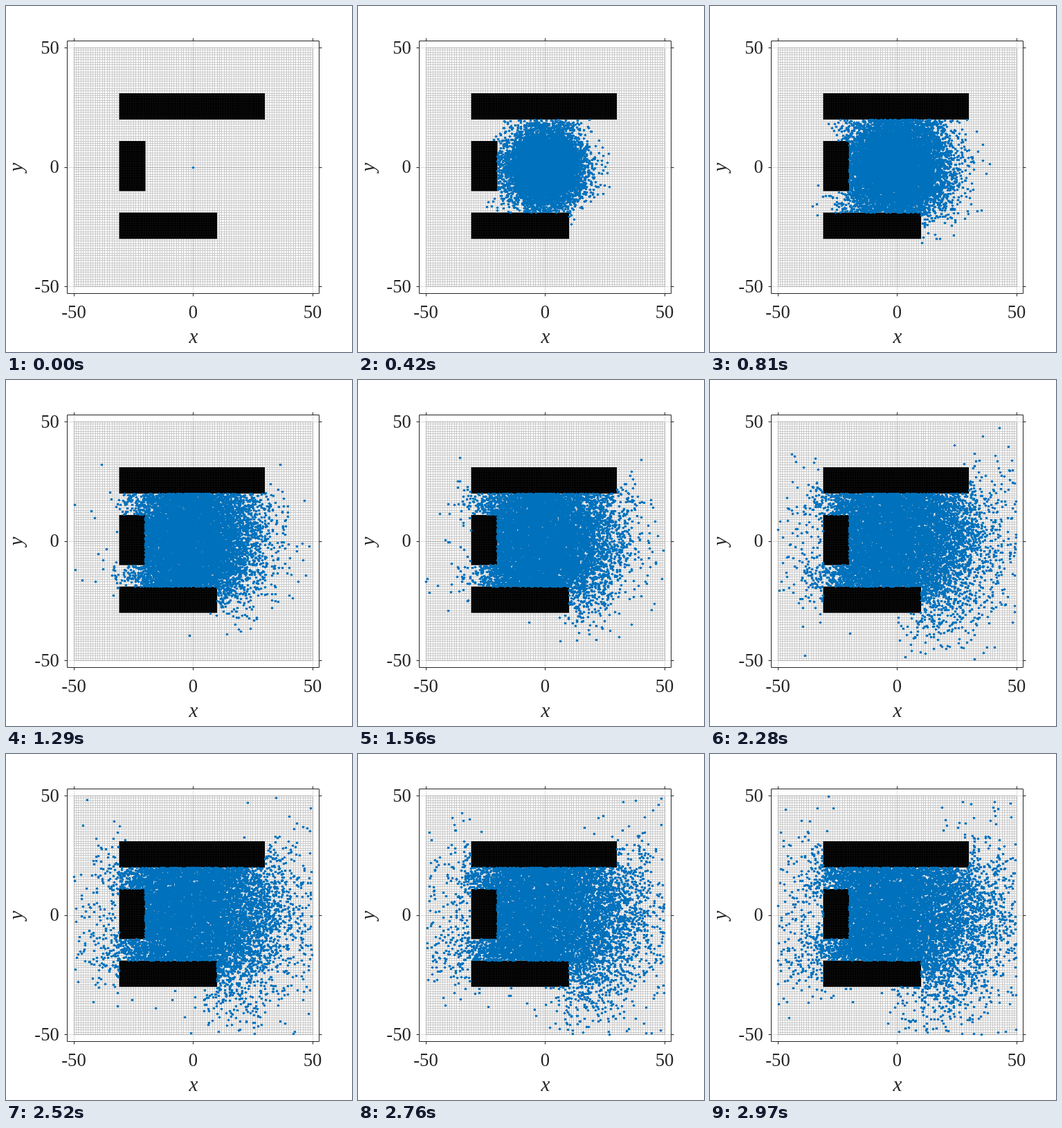
An HTML page with a canvas that plays this animation: 500 by 500 pixels, repeating every 3000 ms.

```html
<!DOCTYPE html>
<html lang="en">
<head>
<meta charset="utf-8">
<title>Random walk among obstacles</title>
<style>
  html, body { margin: 0; width: 100%; height: 100%; overflow: hidden; background: #fff; }
  svg, canvas { position: absolute; left: 0; top: 0; width: 500px; height: 500px; }
  text { font: 26.6px "Liberation Serif", "Noto Serif", serif; fill: #262626; }
  .name { font-size: 29px; font-style: italic; text-anchor: middle; }
</style>
</head>
<body>
<svg viewBox="0 0 500 500">
  <g id="guides" stroke="#dfdfdf"></g>
  <g id="walls"></g>
  <path id="mesh" fill="none" stroke="rgba(40,40,40,.25)" shape-rendering="crispEdges"/>
  <path id="axes" fill="none" stroke="#262626"/>
  <g id="labels"></g>
  <text class="name" x="271" y="486.5">x</text>
  <text class="name" transform="translate(24 233) rotate(-90)">y</text>
</svg>
<canvas id="dots" width="500" height="500"></canvas>
<script>
const FRAME_MS = 30, FRAMES = 100, COUNT = 10000;
const STEP = 2.04, LIMIT = 50, SCALE = 3.45;
const BOX = { left: 88.5, top: 50.5, right: 452.5, bottom: 415.5 };
// Obstacles as x0, x1, y0, y1 in plot units
const WALLS = [[-31, 30, 20, 31], [-31, -20, -10, 11], [-31, 10, -30, -19]];

const byId = id => document.getElementById(id);
const px = x => 270.5 + SCALE * x;
const py = y => 233 - SCALE * y;
const snap = v => Math.floor(v) + 0.5;

function add(parent, tag, attrs, text = '') {
  const el = document.createElementNS('http://www.w3.org/2000/svg', tag);
  for (const key in attrs) el.setAttribute(key, attrs[key]);
  el.textContent = text;
  parent.appendChild(el);
}

function drawPlot() {
  const { left, top, right, bottom } = BOX;
  let mesh = '';
  for (let v = -LIMIT; v <= LIMIT; v++) {
    mesh += `M${snap(px(v))} ${py(LIMIT)}V${py(-LIMIT)}`;
    mesh += `M${px(-LIMIT)} ${snap(py(v))}H${px(LIMIT)}`;
  }
  byId('mesh').setAttribute('d', mesh);

  for (const [x0, x1, y0, y1] of WALLS) {
    add(byId('walls'), 'rect', {
      x: px(x0), y: py(y1), width: SCALE * (x1 - x0), height: SCALE * (y1 - y0)
    });
  }

  let axes = `M${left} ${top}H${right}V${bottom}H${left}Z`;
  for (const v of [-50, 0, 50]) {
    const x = snap(px(v)), y = snap(py(v));
    axes += `M${x} ${top}v-4M${x} ${bottom}v4M${left} ${y}h-4M${right} ${y}h4`;
    add(byId('guides'), 'path', { d: `M${x} ${top}V${bottom}M${left} ${y}H${right}` });
    add(byId('labels'), 'text', { x: px(v), y: 451, 'text-anchor': 'middle' }, v);
    add(byId('labels'), 'text', { x: 76.8, y: py(v) + 8, 'text-anchor': 'end' }, v);
  }
  byId('axes').setAttribute('d', axes);
}

function seeded(seed) {
  return () => {
    seed = (seed + 0x6D2B79F5) | 0;
    let t = Math.imul(seed ^ (seed >>> 15), 1 | seed);
    t = (t + Math.imul(t ^ (t >>> 7), 61 | t)) ^ t;
    return ((t ^ (t >>> 14)) >>> 0) / 4294967296;
  };
}

const outside = (x, y) => Math.abs(x) > LIMIT || Math.abs(y) > LIMIT;
const blocked = (x, y) => outside(x, y) ||
  WALLS.some(([x0, x1, y0, y1]) => x > x0 && x < x1 && y > y0 && y < y1);

// Pixel positions of the walkers for every frame; a blocked walker waits
function simulate() {
  const random = seeded(2024);
  const walkers = Array.from({ length: COUNT }, () => ({ x: 0, y: 0 }));
  const frames = [];
  for (let f = 0; f < FRAMES; f++) {
    const spots = new Int16Array(COUNT * 2);
    walkers.forEach((w, i) => {
      spots[2 * i] = Math.floor(px(w.x));
      spots[2 * i + 1] = Math.floor(py(w.y));
      const r = STEP * Math.sqrt(-2 * Math.log(1 - random()));
      const a = 2 * Math.PI * random();
      const x = w.x + r * Math.cos(a), y = w.y + r * Math.sin(a);
      if (!blocked(x, y)) { w.x = x; w.y = y; }
    });
    frames.push(spots);
  }
  return frames;
}

function makeDot() {
  const dot = document.createElement('canvas');
  dot.width = dot.height = 5;
  const g = dot.getContext('2d');
  g.fillStyle = '#0072bd';
  g.arc(2.5, 2.5, 1.85, 0, 2 * Math.PI);
  g.fill();
  return dot;
}

drawPlot();
const frames = simulate();
const dot = makeDot();
const ctx = byId('dots').getContext('2d');
let shown = -1;

function render(time) {
  const index = Math.floor(time / FRAME_MS) % FRAMES;
  if (index === shown) return;
  shown = index;
  ctx.clearRect(0, 0, 500, 500);
  const spots = frames[index];
  // All walkers share one spot at the start
  const length = index ? spots.length : 2;
  for (let i = 0; i < length; i += 2) {
    ctx.drawImage(dot, spots[i] - 2, spots[i + 1] - 2);
  }
}

const start = performance.now();
function tick() {
  render(performance.now() - start);
  requestAnimationFrame(tick);
}
tick();
</script>
</body>
</html>
```
